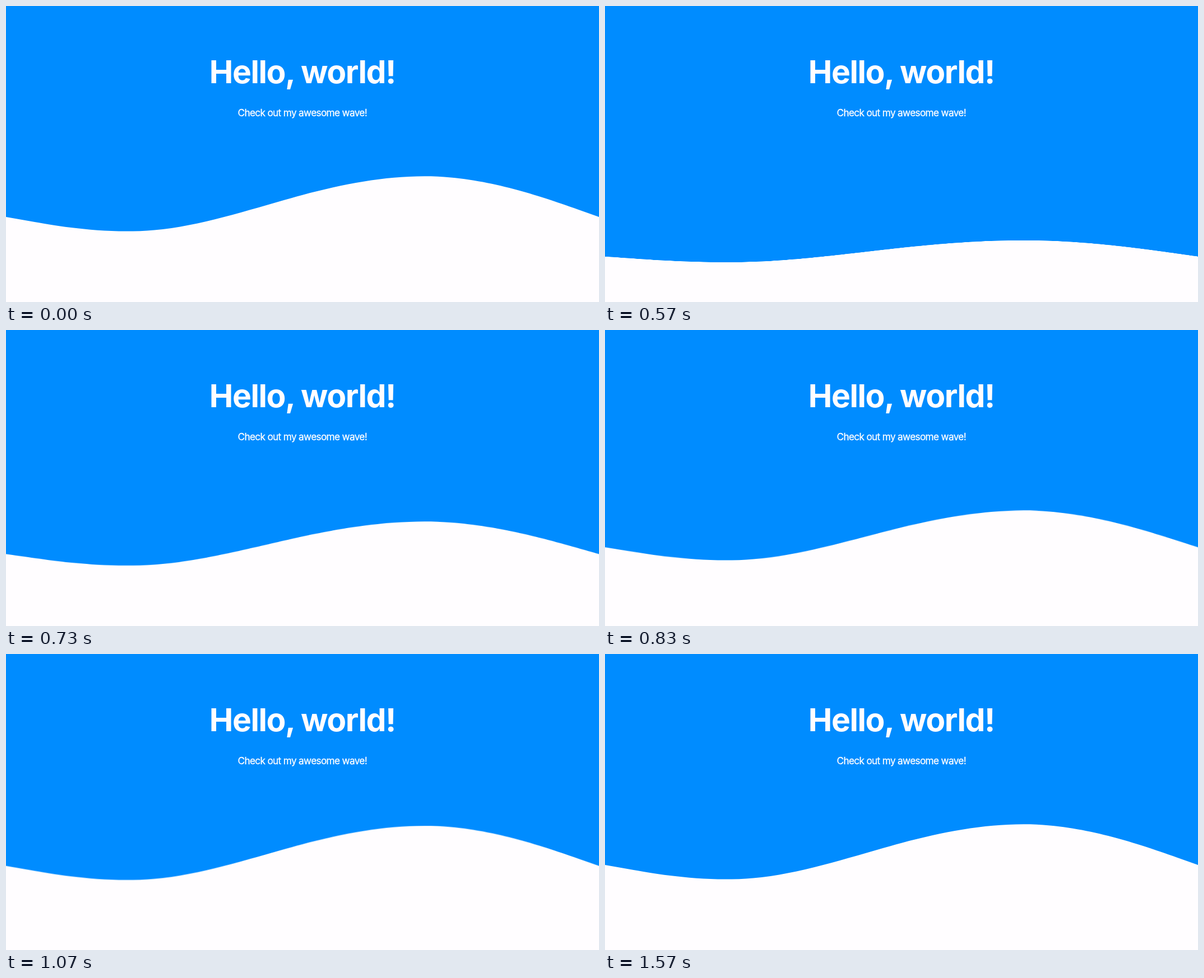
These frames come from a looping animation (1058x529 px, 2030 ms). An HTML page:

```html
<!DOCTYPE html>
<html lang="en">
<head>
<meta charset="utf-8">
<title>Wave</title>
<style>
  html, body { margin: 0; width: 100%; height: 100%; overflow: hidden; background: #fffdff; }
  svg { display: block; width: 1058px; height: 529px; }
  text { fill: #fffdff; font-family: Inter, "Liberation Sans", sans-serif; text-anchor: middle; }
  .title { font-size: 57px; font-weight: 700; letter-spacing: -1.42px; }
  .lead { font-size: 17.2px; letter-spacing: -0.66px; stroke: #fffdff; stroke-width: 0.3px; }
  .paper { fill: #fffdff; }
  #wave { transform-origin: 0 494.5px; }
</style>
</head>
<body>
<svg viewBox="0 0 1058 529">
  <rect width="1058" height="529" fill="#008cff"/>
  <text class="title" x="528.8" y="138">Hello, world!</text>
  <text class="lead" x="528.8" y="197">Check out my awesome wave!</text>
  <path id="wave" class="paper"/>
  <rect class="paper" y="494" width="1058" height="35"/>
</svg>
<script>
const LOOP = 2030, START = 500, FRAME = 100 / 3, RISE_FRAMES = 30;
const BASE = 494.5, UNIT = 1058 / 1440;

// Cubic B-spline through evenly spaced control heights, clamped at both ends.
function wavePath(heights) {
  const step = 1440 / (heights.length - 1);
  const pts = heights.map((y, i) => [i * step, y]);
  const mix = (...terms) => [0, 1].map(axis => {
    const sum = terms.reduce((s, [w, p]) => s + w * p[axis], 0);
    return (axis ? BASE + (sum - 320) * UNIT : sum * UNIT).toFixed(2);
  });
  const last = pts.length - 1;
  let d = `M0,${BASE}L${mix([1, pts[0]])}L${mix([5 / 6, pts[0]], [1 / 6, pts[1]])}`;
  for (let i = 1; i <= last; i++) {
    const a = pts[i - 1], b = pts[i], c = pts[i + 1] || b;
    d += `C${mix([2 / 3, a], [1 / 3, b])} ${mix([1 / 3, a], [2 / 3, b])} `
       + mix([1 / 6, a], [2 / 3, b], [1 / 6, c]);
  }
  return `${d}L${mix([1, pts[last]])}V${BASE}Z`;
}

// cubic-bezier(.23, 1, .32, 1), solved for x by bisection
function easeOut(x) {
  let lo = 0, hi = 1;
  for (let i = 0; i < 40; i++) {
    const s = (lo + hi) / 2, r = 1 - s;
    if (0.69 * s * r * r + 0.96 * s * s * r + s ** 3 < x) lo = s;
    else hi = s;
  }
  return 1 - (1 - lo) ** 3;
}

const pose = (time, scale) => ({
  offset: time / LOOP,
  transform: `scaleY(${scale})`,
  easing: "steps(1, end)"
});

const poses = [pose(0, 1)];
for (let k = 0; k < RISE_FRAMES; k++) {
  const time = Math.round((START + k * FRAME) / 10) * 10;
  poses.push(pose(time, easeOut((k + 1) / RISE_FRAMES)));
}
poses.push(pose(LOOP, 1));

const wave = document.getElementById("wave");
wave.setAttribute("d", wavePath([160, 224, 96, 32, 160]));
wave.animate(poses, { duration: LOOP, iterations: Infinity });
</script>
</body>
</html>
```
